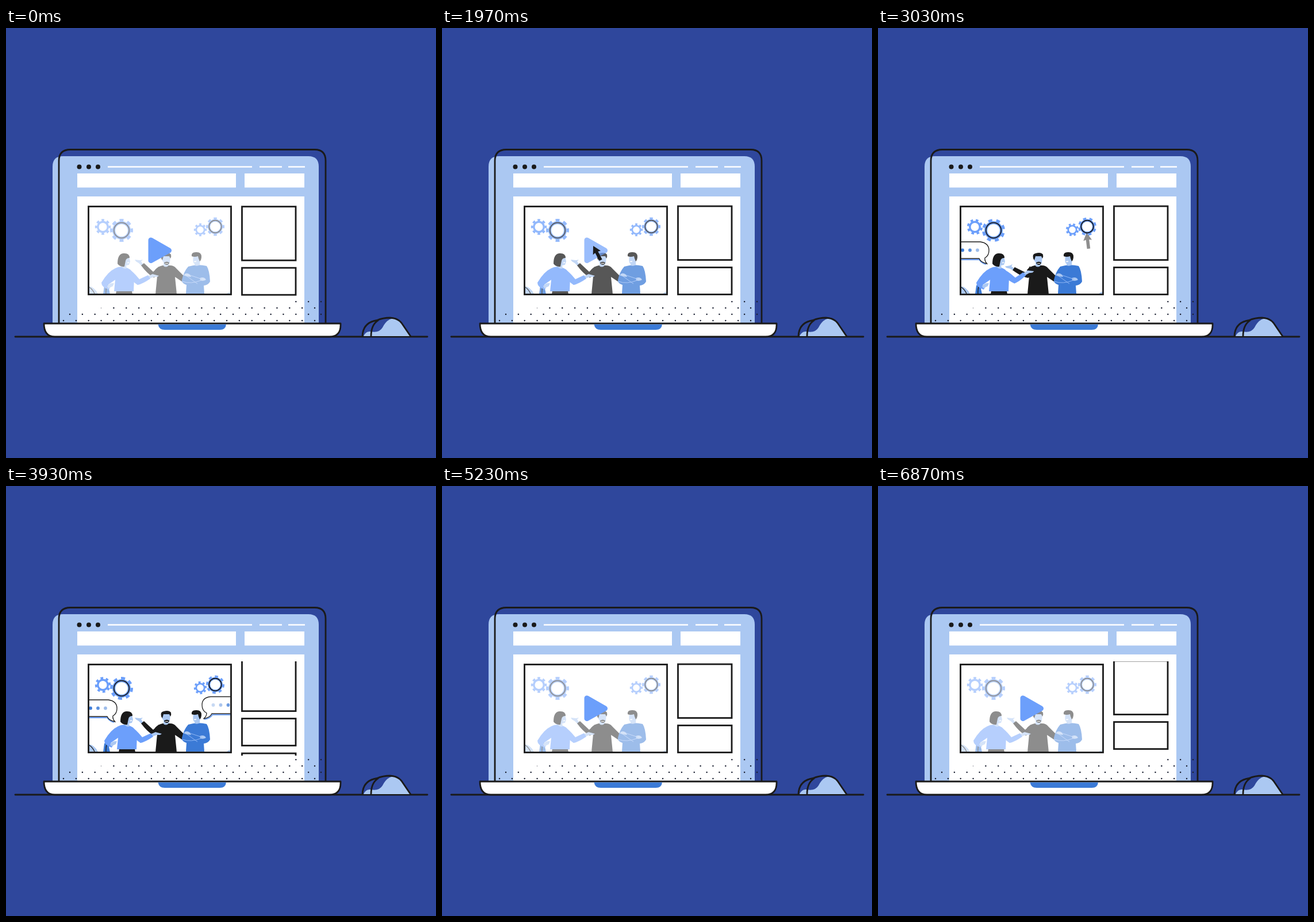
These frames come from a looping animation (748x748 px, 6.93 s). An HTML page:

```html
<!DOCTYPE html>
<html lang="en">
<head>
<meta charset="utf-8">
<title>Laptop video</title>
<style>
html, body { margin: 0; width: 100%; height: 100%; overflow: hidden; background: #2f479c; }
svg { display: block; width: 100vw; height: 100vh; }
.ink { fill: none; stroke: #1a1a1a; stroke-width: 2.8; stroke-linecap: round; stroke-linejoin: round; }
.thin { fill: none; stroke: #1a1a1a; stroke-width: 1.3; }
.hair { fill: #1a1a1a; }
.skin { fill: #abc8f2; }
.blue { fill: #6c9ffb; }
.deep { fill: #3b7ad6; }
.white { fill: #fff; }
</style>
</head>
<body>
<svg viewBox="0 0 748 748">
  <defs>
    <clipPath id="videoClip"><rect x="144" y="311" width="247" height="152"/></clipPath>
    <clipPath id="listClip"><rect x="405" y="305" width="104" height="164"/></clipPath>
  </defs>

  <!-- laptop screen -->
  <path fill="#abc8f2" d="M81 514V241Q81 223 99 223H526Q544 223 544 241V514Z"/>
  <path class="ink" d="M92 514V231Q92 211.5 112 211.5H537Q556 211.5 556 231V514"/>
  <g class="hair"><circle cx="127.5" cy="241.5" r="4"/><circle cx="144" cy="241.5" r="4"/><circle cx="160" cy="241.5" r="4"/></g>
  <path d="M177 241.5H428M441 241.5H480M491 241.5H520" stroke="#fff" stroke-width="2.6"/>
  <path class="white" d="M124 253H400V277.500H124ZM415 253H519V277.500H415ZM124 293H519V514H124Z"/>
  <g id="dots" fill="#1d2233"></g>

  <!-- base, desk and mouse -->
  <path class="ink" d="M16 537H733"/>
  <path class="ink" style="fill:#fff" d="M66 514H582Q583 537 563 537H85Q66 537 66 514Z"/>
  <path class="deep" d="M264.500 515.500H383Q382 525 372 525H276Q266 525 264.500 515.500Z"/>
  <path class="skin" d="M622 536Q626 527 634 528Q649 531 655 521Q662 507 672 505.500Q683 506 689 515L703 536Z"/>
  <path class="ink" d="M620 536Q621 512 645 508.500Q656 504 668 504Q681 504.500 688 513L704 536.500M635 536Q635 516 648 508"/>

  <!-- list of cards -->
  <g clip-path="url(#listClip)"><g id="list" class="ink" style="stroke-linejoin:miter"></g></g>

  <!-- video -->
  <g clip-path="url(#videoClip)">
    <g id="gears"></g>

    <path class="skin" d="M144 449Q154 451 160 462H144Z"/>
    <path class="thin" d="M145 451Q151 455 154 462"/>
    <path class="skin" d="M384 463Q386 459 391 459V463Z"/>

    <!-- man in the middle -->
    <g id="manArm">
      <path class="skin" d="M240 413L235 406L238 403L233 404L224 403L226 406L231 409L237 415Z"/>
      <path class="hair" d="M266 415L256 424L240 409L235 413Q246 428 257 434L265 431Z"/>
    </g>
    <path class="hair" d="M260 463L263 432L259 421Q265 414 273 413H285Q292 413 296 418L310 432L306 441L294 433L297 463Z"/>
    <path class="skin" d="M272 397H286L285 408Q283 412 282 414Q278 417 274 414V407Q270 405 272 397Z"/>
    <path class="hair" d="M270 401Q268 393 274 392Q283 389 287 394Q288 398 286 401L284 397H274L272 404ZM275 408Q280 405 284 408Q283 412 280 412Q276 412 275 408Z"/>
    <path d="M277 409.500H282" stroke="#fff"/>

    <!-- man with folded arms -->
    <path class="deep" d="M317 415Q333 410 349 414Q354 421 355 441Q352 447 344 448L345 462H313L314 447Q305 444 306 438Q309 424 317 415Z"/>
    <path class="skin" d="M326 397L338 398L337 412Q333 415 328 413V410Q324 409 326 397Z"/>
    <path class="hair" d="M323 397Q322 390 330 390Q340 389 340 398Q340 403 337 406L335 401L334 397Q328 399 323 397Z"/>
    <path d="M327 406.500L331 406" stroke="#fff" stroke-width="1.5"/>
    <path class="skin" d="M309 430Q313 424 320 429L322 433L314 432ZM337 435Q345 432 348 438Q343 441 338 439Z"/>
    <path d="M315 432L333 445M307 441Q322 446 339 439M320 430L341 437" fill="none" stroke="#8fb6f4" stroke-width="1"/>

    <!-- woman -->
    <path class="deep" d="M169 463L171 448L177 444L181 463Z"/>
    <path class="thin" d="M174 463Q173 451 178 444"/>
    <g id="woman">
      <path class="hair" d="M192 457H219L220 463H191Z"/>
      <g id="womanArm">
        <path class="skin" d="M246 432L255 428L266 431L263 433L257 433L249 436Z"/>
        <path class="blue" d="M211 418Q220 422 232 437L247 430L251 436Q238 445 229 447Q220 441 213 432Z"/>
      </g>
      <path class="blue" d="M190 418Q199 413 211 417.500Q221 421 223 434L222 458H188L190 438L177 447L182 449L179 455Q166 451 166 443Q177 424 190 418Z"/>
      <path class="skin" d="M176 449Q181 443 188 444L186 449L178 453ZM203 399L214 398L216 406L214 412L209 413L210 418Q205 420 202 416Z"/>
      <path class="hair" d="M194 410Q194 393 204 392Q215 391 215 400Q209 400 208 405L206 415Q198 416 194 410Z"/>
      <path d="M211 408.500L214 408" stroke="#fff" stroke-width="1.5"/>
    </g>

    <!-- speech bubbles -->
    <g id="bubbleL">
      <path d="M144 403H176Q181 410 188 411" fill="none" stroke="#6c9ffb" stroke-width="2"/>
      <path class="thin" style="fill:#fff" d="M142 372H178Q193 374 193 387Q193 396 186 400Q185 405 189.500 410Q179 408 176 401H142Z"/>
    </g>
    <g id="bubbleR">
      <path d="M345 406Q356 404 359 398H391" fill="none" stroke="#6c9ffb" stroke-width="2"/>
      <path class="thin" style="fill:#fff" d="M393 366.500H356Q341 368 341 381Q341 391 349 395Q349 401 343.500 405Q355 403 358 396H393Z"/>
    </g>

    <rect id="veil" class="white" x="144" y="311" width="247" height="152"/>
    <path id="play" d="M252 369L283.500 387L252 404.500Z" fill="#6c9ffb" stroke="#6c9ffb" stroke-width="9" stroke-linejoin="round"/>
    <path id="cursor" class="hair" d="M0 0L7.500 13.500L2.800 12.500V28H-2.800V12.500L-7.500 13.500Z"/>
  </g>
  <rect class="ink" style="stroke-linejoin:miter" x="143.500" y="310.500" width="248" height="153"/>
</svg>
<script>
const LOOP = 6930, CARD_STEP = 167;
const $ = id => document.getElementById(id);

function add(parent, tag, attrs) {
  const el = document.createElementNS('http://www.w3.org/2000/svg', tag);
  for (const key in attrs) el.setAttribute(key, attrs[key]);
  return parent.appendChild(el);
}

// Dot texture: first and last column of each staggered row
[[476, 18, 20, 111], [487, 4, 20, 100], [498, 0, 20, 111], [509, 0, 20, 100]].forEach(([cy, from, to, x0]) => {
  for (let i = from; i <= to; i++) add($('dots'), 'circle', { cx: x0 + i * 21.85, cy, r: 1.25 });
});
add($('dots'), 'circle', { cx: 165.5, cy: 487, r: 0.6 });

for (let i = -1; i < 3; i++) {
  const y = 310 + i * CARD_STEP;
  add($('list'), 'rect', { x: 410.5, y, width: 93.5, height: 93.5 });
  add($('list'), 'rect', { x: 410.5, y: y + 106.5, width: 93.5, height: 47 });
}

function gear(x, y, outer, body, hole, ring) {
  const place = add($('gears'), 'g', { transform: `translate(${x} ${y})` });
  const depth = outer - body + 1;
  const teeth = add(place, 'circle', {
    r: outer - depth / 2, fill: 'none', stroke: '#6c9ffb', 'stroke-width': depth,
    pathLength: 16, 'stroke-dasharray': '1 1', 'stroke-dashoffset': 0.5
  });
  add(place, 'circle', { r: body, class: 'blue' });
  add(place, 'circle', { r: hole, class: 'white' });
  if (ring) add(place, 'circle', { r: ring, class: 'thin', style: 'stroke-width:1.7' });
  return teeth;
}
const gears = [
  gear(168.5, 346, 13.7, 10.5, 7), gear(201, 352, 20, 16, 10.8, 13.3),
  gear(338, 351, 11.2, 8.6, 5.8), gear(364, 345.5, 16, 13, 8.8, 10.8)
];

const typing = (bubble, x, cy) => [0, 1, 2].map(i =>
  add($(bubble), 'circle', { cx: x + i * 13, cy, r: 2.9, class: 'deep' }));
const typingL = typing('bubbleL', 147, 386.5), typingR = typing('bubbleR', 360.5, 381);

const ramp = (t, a, b) => Math.min(1, Math.max(0, (t - a) / (b - a)));
const ease = u => u < 0.5 ? 4 * u ** 3 : 1 - 4 * (1 - u) ** 3;
const move = (t, a, b) => ease(ramp(t, a, b));
const pulse = (t, a, b, c, d) => move(t, a, b) - move(t, c, d);
const set = (id, name, value) => $(id).setAttribute(name, value);

function blink(dots, phase) {
  dots.forEach((dot, i) => dot.setAttribute('opacity', 0.65 + 0.35 * Math.cos(phase + i)));
}

function draw(t) {
  // cards scroll by one full step, so each scroll ends where it began
  const scroll = CARD_STEP * (move(t, 3565, 4965) + move(t, 6580, 7980)) - 0.7 * (1 - ramp(t, 0, 1000));
  set('list', 'transform', `translate(0 ${-(scroll > 300 ? 0 : scroll < CARD_STEP ? scroll : scroll - CARD_STEP)})`);

  const playing = ramp(t, 1840, 2120) - ramp(t, 4900, 5200);
  set('veil', 'opacity', 0.5 * (1 - playing));
  set('play', 'opacity', 1 - (t < 3500 ? ramp(t, 1840, 2250) : 1 - ramp(t, 4900, 5200)));

  const turn = 90 * ramp(t, 2150, 5150);
  gears.forEach((g, i) => g.setAttribute('transform', `rotate(${i % 2 ? turn : -turn})`));

  set('woman', 'transform', `translate(${5 * pulse(t, 2350, 2850, 3900, 4350)} 0)`);
  const gesture = pulse(t, 2500, 2980, 3150, 3700);
  set('womanArm', 'transform', `rotate(${-9 * gesture} 215 424)`);
  set('manArm', 'transform', `rotate(${-17 * gesture} 262 420)`);

  set('bubbleL', 'opacity', ramp(t, 2350, 2600) - ramp(t, 4850, 5100));
  set('bubbleR', 'opacity', ramp(t, 3650, 3950) - ramp(t, 4850, 5100));
  const phase = (t - 3030) / 900 * 2 * Math.PI;
  blink(typingL, phase);
  blink(typingR, phase + Math.PI);

  const enter = move(t, 950, 1700), leave = move(t, 2150, 2850);
  const x = 208 + 55 * enter + 100 * leave;
  const y = 394 - 15 * enter - 23 * leave;
  const tilt = -42 + 14 * enter + 21 * leave;
  const press = 1 - 0.12 * pulse(t, 1700, 1790, 1790, 1900);
  set('cursor', 'transform', `translate(${x} ${y}) rotate(${tilt}) scale(${press})`);
  set('cursor', 'opacity', ramp(t, 950, 1200) - ramp(t, 2930, 3130));
}

const start = performance.now();
function tick() {
  draw((performance.now() - start) % LOOP);
  requestAnimationFrame(tick);
}
tick();
</script>
</body>
</html>
```
